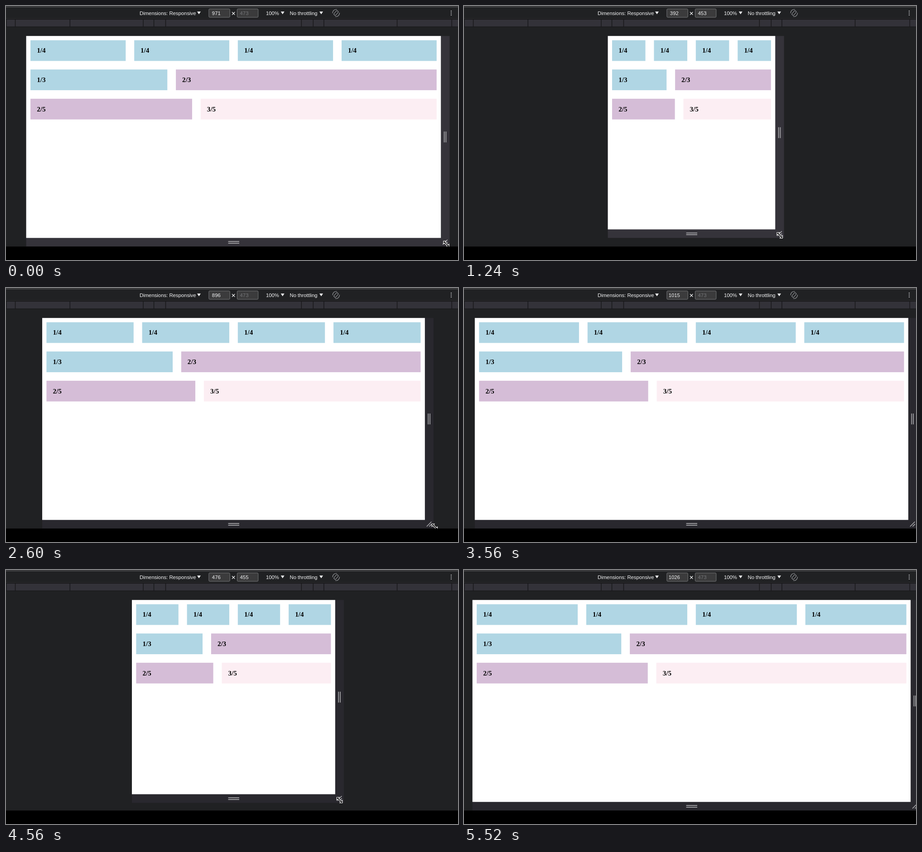
Recreate the animation shown at these times as an HTML page. Size 998x561 px, loop 5.72 s.

```html
<!DOCTYPE html>
<html lang="en">
<head>
<meta charset="utf-8">
<title>Responsive grid</title>
<style>
  html, body { margin: 0; width: 100%; height: 100%; overflow: hidden; background: #202123; }
  #stage { position: relative; width: 998px; height: 561px; overflow: hidden; }
  #bar, #page, svg { position: absolute; left: 0; top: 0; }
  /* Laid out at double density, then scaled down */
  #page {
    background: #fff; overflow: hidden; transform-origin: 0 0;
    font: bold 32px/37px "Liberation Serif", "Times New Roman", serif; color: #000;
  }
  .row { display: flex; }
  .row div { margin: 20px; padding: 30px; min-width: 0; flex: 1; }
  .row .two { flex: 2; }
  .row .three { flex: 3; }
  .blue { background: #b0d6e4; }
  .plum { background: #d5bdd7; }
  .rose { background: #fceef3; }
  svg text { font: 11.32px "Liberation Sans", Arial, sans-serif; fill: #f4f5f6; }
</style>
</head>
<body>
<div id="stage">
  <div id="bar"></div>
  <div id="page">
    <div class="row">
      <div class="blue">1/4</div><div class="blue">1/4</div><div class="blue">1/4</div><div class="blue">1/4</div>
    </div>
    <div class="row"><div class="blue">1/3</div><div class="plum two">2/3</div></div>
    <div class="row"><div class="plum two">2/5</div><div class="rose three">3/5</div></div>
  </div>
  <svg width="998" height="561" viewBox="0 0 998 561">
    <g stroke="#aaaaad" stroke-width="1.7" fill="none">
      <path id="right" d="M-1.9-12V12M1.9-12V12"/>
      <path id="bottom" d="M-12.2-1.9H12.2M-12.2 1.9H12.2"/>
      <path id="corner" d="M4 14.5L14.5 4M9.5 14.5L14.8 9.2"/>
    </g>
    <path id="cursor" fill="#000" stroke="#fff" stroke-width="1.1"
      d="M-6.2-6.2H-.4L-2.3-4.3L4.3 2.3L6.2 .4V6.2H.4L2.3 4.3L-4.3-2.3L-6.2-.4Z"/>

    <path fill="#202123" d="M0 0H998V29H0Z"/>
    <path fill="#2c2c2e" d="M0 0H998V2H0Z"/>
    <path fill="#4a4b4d" d="M0 1.6H998V3H0Z"/>
    <path fill="#3a3a3d" d="M0 27.6H998V28.6H0Z"/>
    <path fill="#1a1a1c" d="M0 28.6H998V46H0Z"/>
    <g id="ruler" fill="#333239" stroke="#1a1a1c" stroke-width="1.6"></g>

    <text x="295" y="19.6">Dimensions: Responsive</text>
    <text x="574" y="19.6">100%</text>
    <text x="626.5" y="19.6">No throttling</text>
    <path fill="#f4f5f6" d="M422 12.3h8l-4 6zM606.7 12.3h8l-4 6zM692 12.3h8l-4 6z"/>
    <path stroke="#f4f5f6" stroke-width="1.3" d="M499 13.2l6.4 6.4M505.4 13.2l-6.4 6.4"/>
    <g fill="#3b3b3c" stroke="#77787a">
      <rect x="447.9" y="6.4" width="46.4" height="18.6" rx="2"/>
      <rect x="510.4" y="6.4" width="46.4" height="18.6" rx="2"/>
    </g>
    <text id="wide" x="464.3" y="19.6" text-anchor="middle"></text>
    <text id="tall" x="526" y="19.6" text-anchor="middle"></text>
    <g transform="translate(728.8 15.5) rotate(40)" fill="none" stroke="#909296" stroke-width="1.2">
      <rect x="-2.5" y="-5.5" width="5" height="11" rx="1"/>
      <path d="M-3.6-7.2A8 8 0 0 0-5.4 5.4M3.6 7.2A8 8 0 0 0 5.4-5.4"/>
    </g>
    <path stroke="#a5a7aa" stroke-width="2.6" stroke-linecap="round" d="M983 11.2h0M983 15.5h0M983 19.8h0"/>
    <path d="M0 531.3H998V561H0Z"/>
  </svg>
</div>
<script>
const LOOP = 5720, STEP = 40, SCALE = 0.943, CX = 502.4, TOP = 66.2, BAR = 18.9;
const MAX_W = 1026, MAX_H = 473;

// Drags of the corner; a shapes the start of the move, b its end
const drags = [
  { t0: 0,    t1: 1740, from: 971,   to: 322,   a: 1.5, b: 2.424 },
  { t0: 1740, t1: 2920, from: 322,   to: MAX_W, a: 2,   b: 2.23 },
  { t0: 3520, t1: 4780, from: MAX_W, to: 428,   a: 1.3, b: 1.67 },
  { t0: 4780, t1: 5520, from: 428,   to: MAX_W, a: 2,   b: 1.9 }
];

const $ = id => document.getElementById(id);
const ramp = (t, t0, t1) => Math.min(1, Math.max(0, (t - t0) / (t1 - t0)));
const smooth = (t, t0, t1) => {
  const u = ramp(t, t0, t1);
  return u * u * (3 - 2 * u);
};

function widthAt(t) {
  const { t0, t1, from, to, a, b } = drags.findLast(d => t >= d.t0) || drags[0];
  return from + (to - from) * (1 - (1 - ramp(t, t0, t1) ** a) ** b);
}

// The height dips a little during each narrow phase
function heightAt(t) {
  return MAX_H - 20 * (smooth(t, 640, 1200) - smooth(t, 2000, 2600))
    - 18 * (smooth(t, 4000, 4560) - smooth(t, 4760, 5240));
}

function place(id, x, y) {
  $(id).setAttribute("transform", `translate(${x.toFixed(2)} ${y.toFixed(2)})`);
}

function setBox(id, x, width, height, scale) {
  Object.assign($(id).style, {
    width: width + "px",
    height: height + "px",
    transform: `translate(${x}px, ${TOP}px) scale(${scale})`
  });
}

function draw(time) {
  const t = Math.floor(time / STEP) * STEP;
  const w = Math.round(widthAt(t)), h = Math.round(heightAt(t));
  const half = w * SCALE / 2, right = CX + half, bottom = TOP + h * SCALE;

  // Now and then the page repaints a little late
  const pageW = t % 160 ? w : Math.round(widthAt(t - 12));
  setBox("page", CX - pageW * SCALE / 2, pageW * 2, h * 2, SCALE / 2);
  setBox("bar", CX - half, 2 * half + BAR, bottom - TOP + BAR, 1);
  $("bar").style.background = t < 2440 ? "#35333a" : "#29282e";

  place("right", right + 9.3, (TOP + bottom) / 2);
  place("bottom", 502.8, bottom + 9.8);
  place("corner", right, bottom);

  // The pointer runs ahead of the corner in the direction of the drag
  const lead = Math.tanh((widthAt(t + STEP) - widthAt(t)) / 8);
  place("cursor", right + BAR - 3.5 + 6.1 * lead, bottom + BAR - 5 + lead);
  $("cursor").style.display = w > 1000 ? "none" : "";

  $("wide").textContent = w;
  $("tall").textContent = h;
  $("tall").style.fill = h === MAX_H ? "#77787b" : "";
}

// Nested device widths, widest first
$("ruler").innerHTML = [1064, 1022, 766, 423, 373, 318].map(w =>
  `<rect x="${CX - w * SCALE / 2}" y="29.2" width="${w * SCALE}" height="16.9"/>`).join("");

const start = performance.now();
function tick() {
  draw((performance.now() - start) % LOOP);
  requestAnimationFrame(tick);
}
tick();
</script>
</body>
</html>
```
